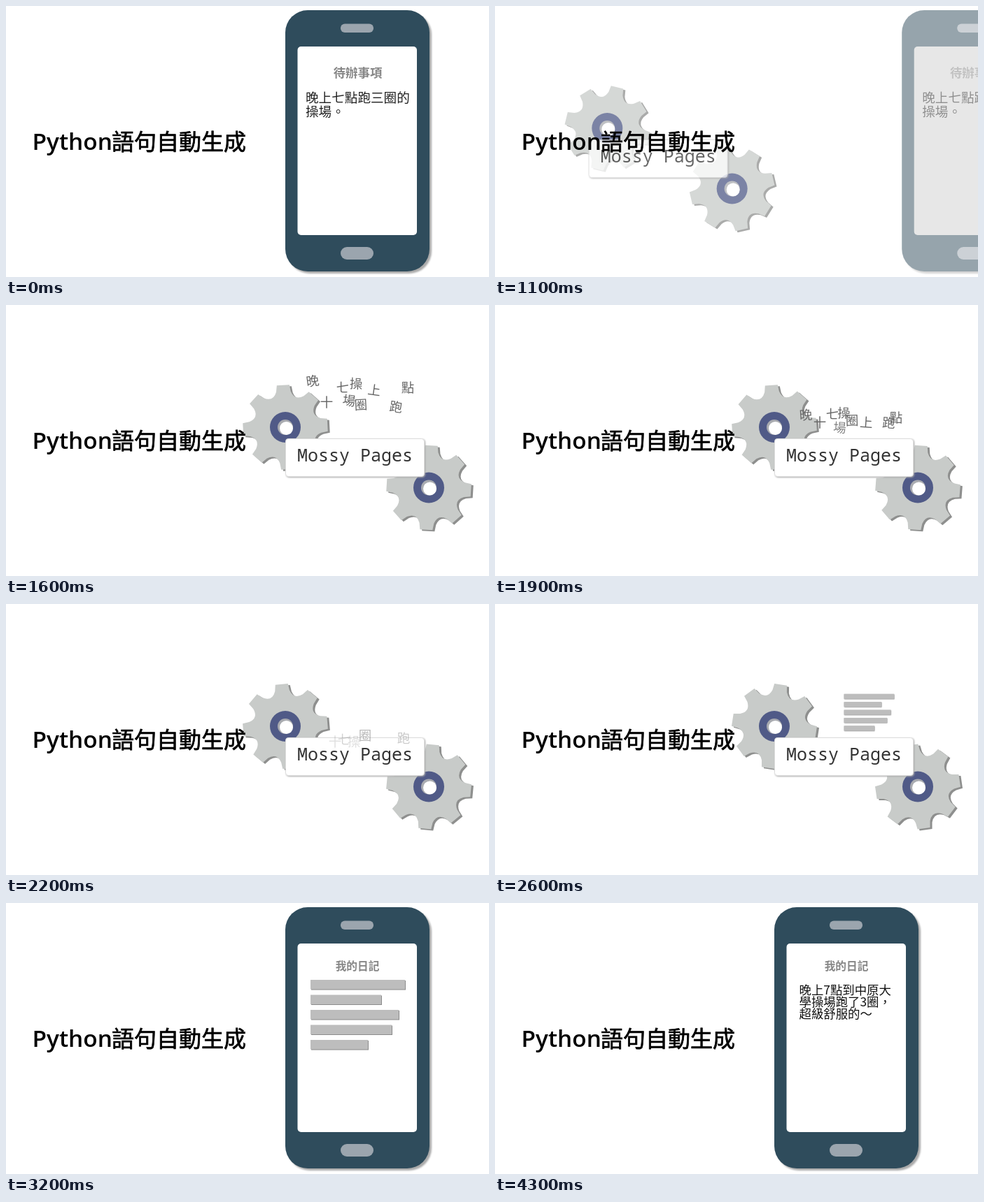
Recreate the animation shown at these times as an HTML page. Size 690 px wide and 388 px high, loop 5.3 s.

```html
<!DOCTYPE html>
<html lang="zh-Hant">
<head>
<meta charset="utf-8">
<style>
html, body { margin: 0; width: 100%; height: 100%; overflow: hidden; background: #fff; }
svg { display: block; font-family: 'Noto Sans CJK TC', 'Noto Sans CJK', sans-serif; }
.head { font-weight: 700; fill: #868686; text-anchor: middle; }
.title { font-size: 32px; font-weight: 500; }
.latin { font: 600 33.4px 'Open Sans', sans-serif; }
.cjk { stroke: #000; stroke-width: .7px; }
.name { font: 25px 'Noto Sans Mono', monospace; fill: #333; }
.raised { filter: drop-shadow(3px 2.5px 0 #8e8f8e); }
#chars { font-size: 18.5px; fill: #666; text-anchor: middle; }
</style>
</head>
<body>
<svg width="690" height="388" viewBox="0 0 690 388">
  <g id="phone">
    <rect x="399" y="6" width="206" height="374" rx="32" fill="#2f4c5c" style="filter:drop-shadow(3px 3px 1px #aaa)"/>
    <g fill="#9ba5ae">
      <rect x="478" y="25.5" width="47" height="12.5" rx="6"/>
      <rect x="478" y="345" width="47" height="18" rx="9"/>
    </g>
    <rect id="screen" x="416.5" y="58" width="170.5" height="270" rx="5"/>
    <g id="todo" font-size="18.6" fill="#222">
      <text class="head" x="502.5" y="101.5" font-size="17.4">待辦事項</text>
      <text x="428" y="138">晚上七點跑三圈的</text>
      <text x="428" y="158">操場。</text>
    </g>
    <g id="diary">
      <text class="head" x="502" y="95.5" font-size="15.7">我的日記</text>
      <g id="entry" font-size="17.4" fill="#111">
        <text x="434.5" y="130.5">晚上7點到中原大</text>
        <text x="434.5" y="147.5">學操場跑了3圈，</text>
        <text x="434.5" y="164.5">超級舒服的～</text>
      </g>
    </g>
  </g>
  <g id="gear1" class="raised"></g>
  <g id="gear2" class="raised"></g>
  <g id="bars" fill="#bdbdbd" style="filter:drop-shadow(1.5px 1.5px 0 #8c8c8c)"></g>
  <g id="box">
    <rect x="399.5" y="191.5" width="198" height="54" rx="4" fill="#fff" stroke="#ddd" style="filter:drop-shadow(1px 1.5px 1px #aaa)"/>
    <text class="name" x="416" y="223.5">Mossy Pages</text>
  </g>
  <g id="chars"></g>
  <text class="title" y="206"><tspan class="latin" x="37.5">Python</tspan><tspan class="cjk" x="151">語句自動生成</tspan></text>
</svg>
<script>
const LOOP = 5300, STEP = 100, SPIN = 0.1467;
const $ = id => document.getElementById(id);
const clamp = v => Math.max(0, Math.min(1, v));
const ease = p => 1 - (1 - clamp(p)) ** 2;
const mix = (a, b, p) => a + (b - a) * p;

function gearPath() {
  let d = '';
  for (let i = 0; i < 8; i++) {
    const at = (r, deg) => {
      const a = (i * 45 + deg) * Math.PI / 180;
      return (r * Math.cos(a)).toFixed(2) + ' ' + (r * Math.sin(a)).toFixed(2);
    };
    d += `${i ? 'L' : 'M'}${at(61, -8.5)}L${at(61, 8.5)}L${at(52, 11.5)}Q${at(40, 22.5)} ${at(52, 33.5)}`;
  }
  return d + 'Z';
}

const gears = [
  { el: $('gear1'), x: 399, y: 175, phase: -3, dir: 1, travel: 537 },
  { el: $('gear2'), x: 604, y: 261.5, phase: 3.5, dir: -1, travel: 597 }
];
for (const g of gears) {
  g.el.innerHTML = `<path d="${gearPath()}" fill="#c8cbc9"/>
    <circle r="22" fill="#505a87"/><circle r="11" fill="#a9abb0"/>
    <circle cx="1.5" cy="1.5" r="9.5" fill="#fff"/>`;
  g.wheel = g.el.firstChild;
}

$('bars').innerHTML = [135, 101, 126, 116, 82].map((w, i) =>
  `<rect y="${i * 21.5}" width="${w}" height="13.5"/>`).join('');

// character, start x, y, tilt, then x, y at the box
const chars = [
  ['晚', 438, 109, -8, 450, 206], ['七', 481, 118, 0, 483, 194], ['操', 500, 113, 3, 497, 197],
  ['上', 526, 122, 8, 535, 215], ['點', 574, 118, 0, 572, 205], ['十', 458, 139, 0, 470, 197],
  ['場', 490, 137, 8, 495, 215], ['圈', 507, 143, -3, 513, 188], ['跑', 557, 146, 8, 568, 192]
];
$('chars').innerHTML = chars.map(c => `<text y="6.5">${c[0]}</text>`).join('');

function place(el, x, y, opacity, extra = '') {
  el.setAttribute('transform', `translate(${x} ${y}) ${extra}`);
  el.style.opacity = opacity;
}

function draw(t) {
  // 0: phone on stage, 1: gears on stage
  const s = t < 1100 ? 0 : t < 3000 ? ease((t - 1000) / 300) : 1 - ease((t - 3000) / 200);
  const shown = clamp(s * 1.35);

  place($('phone'), s * 328, 0, 1 - 0.9 * s);
  const grey = 255 - 83 * s;
  $('screen').style.fill = `rgb(${grey},${grey},${grey})`;
  $('todo').style.display = t < 2000 ? '' : 'none';
  $('diary').style.display = t < 2000 ? 'none' : '';
  const written = clamp((t - 4100) / 200);
  $('entry').style.opacity = written;

  for (const g of gears) {
    place(g.el, g.x - (1 - s) * g.travel, g.y, shown);
    g.wheel.setAttribute('transform', `rotate(${g.phase + g.dir * SPIN * (t - 1600)})`);
  }
  place($('box'), (s - 1) * 597, 0, shown);

  const rise = ease((t - 2200) / 500);
  const grow = t < 3000 ? 0 : 1 - s;
  place($('bars'), mix(498.5, 435, grow), mix(mix(195, 126, rise), 110, grow),
    t < 2300 ? 0 : 1 - written, `scale(${mix(0.53, 1, grow)})`);

  const k = (t - 1600) / 600;
  chars.forEach(([, x0, y0, tilt, x1, y1], i) => {
    const y = k < 0 ? y0 + 140 * k : mix(y0, y1, k);
    const alpha = clamp((t - 1200) / 300) * clamp((204 - y) / 35);
    place($('chars').children[i], mix(x0, x1, k), y, alpha, `rotate(${tilt * (1 - k)})`);
  });
}

const start = performance.now();
function frame() {
  const t = (performance.now() - start) % LOOP;
  draw(Math.floor(t / STEP) * STEP);
  requestAnimationFrame(frame);
}
frame();
</script>
</body>
</html>
```
